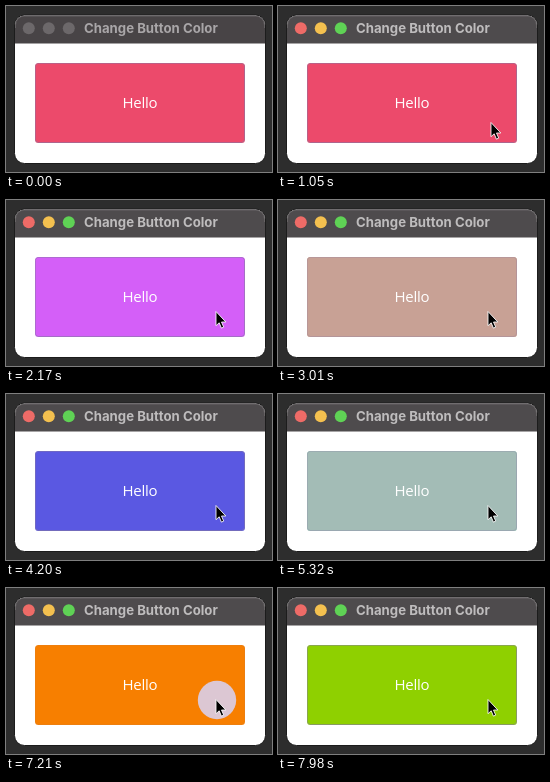
An HTML page that plays this animation: 266 px wide and 166 px high, repeating every 8 s.

```html
<!DOCTYPE html>
<html lang="en">
<head>
<meta charset="utf-8">
<title>Change Button Color</title>
<style>
html, body { margin: 0; width: 100%; height: 100%; overflow: hidden; background: #2d2d2d; }
svg { display: block; width: 100vw; height: 100vh; }
.title { font: 700 13.2px Inter, sans-serif; }
.label { font: 500 15px "Open Sans", sans-serif; letter-spacing: -.25px; fill: #fff; text-anchor: middle; }
</style>
</head>
<body>
<svg viewBox="0 0 266 166">
  <defs>
    <clipPath id="face"><rect x="29" y="57" width="210" height="80" rx="3.5"/></clipPath>
  </defs>
  <rect x="8.5" y="9" width="251" height="148.5" rx="10" fill="#fff" stroke="#1c1c1c"/>
  <path id="bar" d="M9 37.5V19a9.5 9.5 0 0 1 9.5-9.5H249.5a9.5 9.5 0 0 1 9.5 9.5V37.5Z"/>
  <path d="M9.5 22V19a9 9 0 0 1 9-9H249.5a9 9 0 0 1 9 9V22" fill="none" stroke="#777476" stroke-opacity=".6"/>
  <g id="lights">
    <circle cx="22.8" cy="22.2" r="6"/>
    <circle cx="42.8" cy="22.2" r="6"/>
    <circle cx="62.8" cy="22.2" r="6"/>
  </g>
  <text id="title" class="title" x="78" y="27">Change Button Color</text>
  <g clip-path="url(#face)">
    <rect id="fill" x="29" y="57" width="210" height="80"/>
    <circle id="ripple" cx="211" cy="112" fill="#dcc7d3"/>
    <rect id="edge" x="29.3" y="57.3" width="209.2" height="79.2" rx="3.2" fill="none" stroke="#8478a4" stroke-opacity=".6"/>
  </g>
  <text class="label" x="134" y="102">Hello</text>
  <path id="cursor" d="M0 0V14.2L3.2 11.3 5.4 16.6 7.7 15.6 5.5 10.5H9.8Z" stroke="#fff" stroke-opacity=".85" stroke-linejoin="round"/>
</svg>
<script>
const LOOP = 8000, ACTIVATE = 910, RELEASE = 105, FADE = 490;
const START_COLOR = '#ec4a6b';
const clicks = [
  [1610, '#d45ff8'], [2590, '#ac6c39'], [3710, '#5a58e2'],
  [4900, '#4fae8c'], [6020, '#f77f00'], [7140, '#8fd000']
];
const lightColors = ['#ee6b67', '#f4c04f', '#5fd255'];
const $ = id => document.getElementById(id);
const lerp = (a, b, k) => a + (b - a) * k;

// Eased progress from time a to time b
function ease(t, a, b) {
  const k = Math.min(1, Math.max(0, (t - a) / (b - a)));
  return k * k * (3 - 2 * k);
}

function drawWindow(t) {
  const active = t >= ACTIVATE;
  $('bar').setAttribute('fill', active ? '#4e4b4d' : '#484446');
  $('title').setAttribute('fill', active ? '#bebcbd' : '#a9a6a8');
  [...$('lights').children].forEach((c, i) =>
    c.setAttribute('fill', active ? lightColors[i] : '#6c686a'));
}

function drawButton(t) {
  let color = START_COLOR, radius = 0, alpha = 0;
  for (const [start, next] of clicks) {
    const age = t - start;
    if (age >= RELEASE) color = next;
    if (age >= 0 && age < FADE) {
      radius = 150 * ((age + 1) / 350) ** 1.3;
      alpha = 1 - (age / FADE) ** 6;
    }
  }
  $('fill').setAttribute('fill', color);
  $('ripple').setAttribute('r', radius);
  $('ripple').setAttribute('opacity', alpha);
  $('edge').setAttribute('opacity', 1 - 0.85 * alpha);
}

function drawCursor(t) {
  const enter = ease(t, 280, 770), settle = ease(t, 1050, 1400);
  const x = lerp(222, 213, enter) - 3 * settle;
  const y = lerp(168, 116.5, enter) - 5 * settle;
  $('cursor').setAttribute('transform', `translate(${x} ${y})`);
}

function frame(now) {
  const t = now % LOOP;
  drawWindow(t);
  drawButton(t);
  drawCursor(t);
  requestAnimationFrame(frame);
}
frame(0);
</script>
</body>
</html>
```
